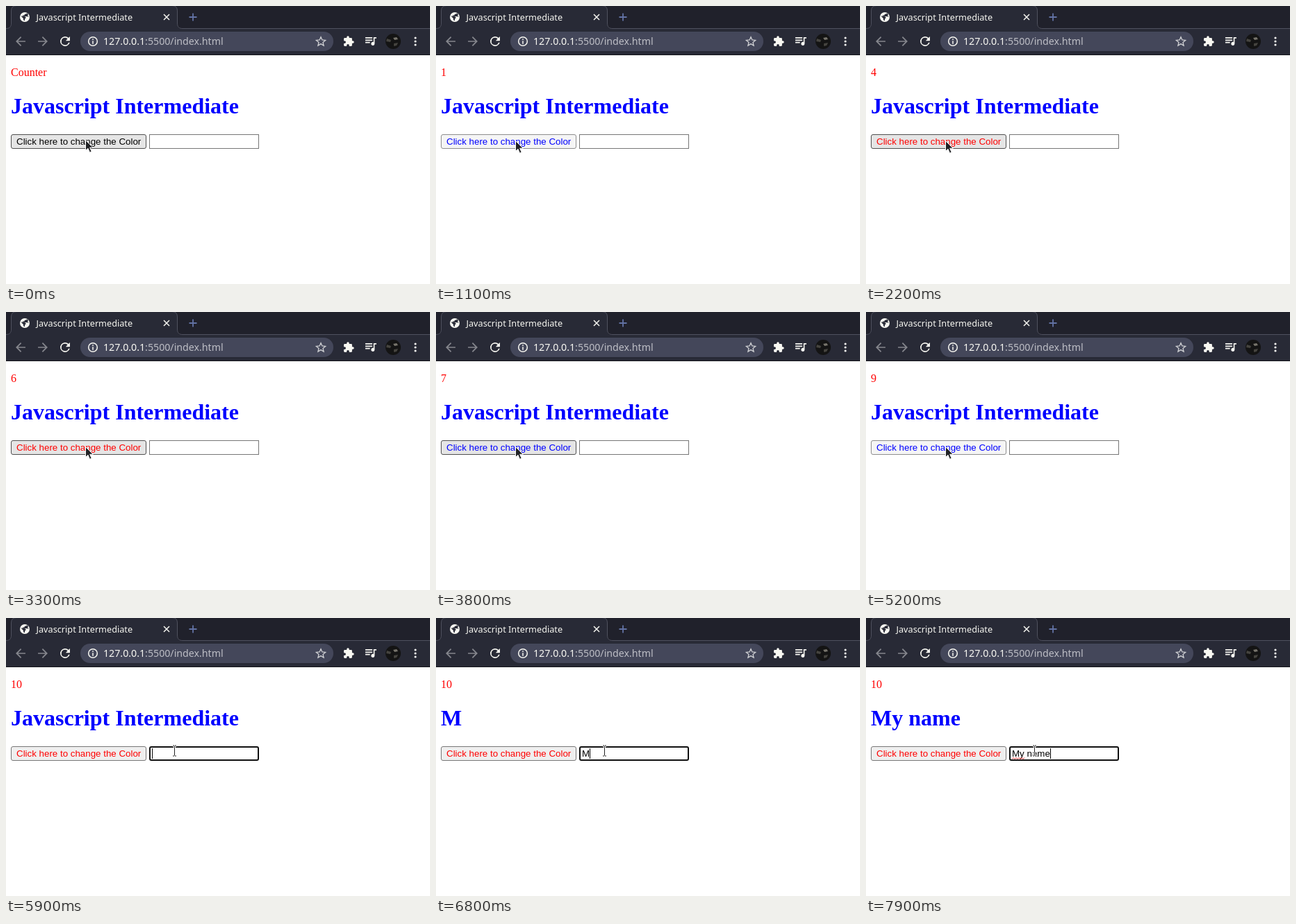
These frames come from a looping animation (610 px wide and 401 px high, 8 s). An HTML page:

```html
<!DOCTYPE html>
<html lang="en">
<head>
<meta charset="utf-8">
<title>Javascript Intermediate</title>
<style>
  html, body { margin: 0; width: 100%; height: 100%; overflow: hidden; background: #fff; }
  svg { display: block; }
  text { white-space: pre; }
  .ui { font-family: "Noto Sans", sans-serif; fill: #f8f8f2; }
  .serif { font-family: "Liberation Serif", serif; }
  .sans { font: 13.333px "Liberation Sans", sans-serif; }
  .line { fill: none; stroke: #f8f8f2; stroke-width: 1.5; }
</style>
</head>
<body>
<svg width="610" height="401" viewBox="0 0 610 401">
  <!-- Browser window -->
  <rect width="610" height="33" fill="#20212b"/>
  <rect y="32" width="610" height="39" fill="#282a36"/>
  <path d="M0 32.5C5 32.5 7.5 30 7.5 25V7Q7.5 -.5 15 -.5H239Q246.500 -.5 246.500 7V25C246.500 30 249 32.500 254 32.500H610V34H0Z" fill="#282a36"/>
  <path d="M0 32.5C5 32.5 7.5 30 7.5 25V7Q7.5 -.5 15 -.5H239Q246.5 -.5 246.5 7V25C246.5 30 249 32.5 254 32.5H610" fill="none" stroke="#50525f"/>
  <rect y="70" width="610" height="1" fill="#15161c"/>
  <circle cx="27" cy="16" r="7" fill="#f8f8f2"/>
  <path d="M21.500 14.500L25 18v2l2 1.500v-3l2-1.500-2-2h-3v-1.500h2l1.500-2h2l.5-1.500 2 2-1 2 2 1.500h1" fill="#282a36"/>
  <text class="ui" x="43.500" y="21" font-size="12.7">Javascript Intermediate</text>
  <path class="line" d="M227 12l8 8m0-8l-8 8"/>
  <path d="M263.500 16h11M269 10.500v11" stroke="#6272a4" stroke-width="1.800"/>

  <rect x="107" y="37" width="364" height="28" rx="14" fill="#44475a"/>
  <circle class="line" cx="125" cy="51" r="6.300"/>
  <path class="line" d="M125 47.300v1.600m0 1.300v4.500"/>
  <text class="ui" x="140" y="56" font-size="14.200">127.0.0.1<tspan fill="#bdbec5">:5500/index.html</tspan></text>
  <path class="line" stroke-width="1.300" d="M453 44.700l1.900 4.300 4.700.4-3.600 3.100 1.100 4.600-4.100-2.500-4.100 2.500 1.100-4.600-3.600-3.100 4.700-.4z" style="stroke:#d0d1d4;stroke-width:1.300"/>

  <g fill="#f8f8f2">
    <g fill="#85868d">
      <path id="arrow" transform="translate(21 51) scale(.87) translate(-12 -12)" d="M20 11H7.830l5.590-5.590L12 4l-8 8 8 8 1.410-1.410L7.830 13H20z"/>
      <use href="#arrow" transform="translate(74 0) scale(-1 1)"/>
    </g>
    <path transform="translate(85 51) scale(.87) translate(-12 -12)" d="M17.650 6.350A8 8 0 1 0 19.730 14h-2.080A6 6 0 1 1 12 6c1.660 0 3.140.69 4.220 1.780L13 11h7V4z"/>
    <path transform="translate(493 51) scale(.7) translate(-12 -12)" d="M20.500 11H19V7c0-1.100-.9-2-2-2h-4V3.500a2.500 2.500 0 0 0-5 0V5H4c-1.100 0-2 .9-2 2v3.800h1.500a2.700 2.700 0 0 1 0 5.400H2V20c0 1.100.9 2 2 2h3.800v-1.500a2.700 2.700 0 0 1 5.400 0V22H17c1.100 0 2-.9 2-2v-4h1.500a2.500 2.500 0 0 0 0-5z"/>
    <path transform="translate(524.500 51) scale(.84) translate(-12 -13)" d="M15 6H3v2h12zm0 4H3v2h12zM3 16h8v-2H3zM17 6v8.200a3 3 0 1 0 2 2.800V8h3V6z"/>
    <circle cx="589" cy="46" r="1.600"/>
    <circle cx="589" cy="51" r="1.600"/>
    <circle cx="589" cy="56" r="1.600"/>
  </g>
  <circle cx="557" cy="51" r="11" fill="#141414"/>
  <path d="M548 47l6 2-1 3-6-1zM558 54l6-1-2 4-4 1z" fill="#45443f"/>
  <path d="M557 46l5-1 2 3-5 1z" fill="#77746c"/>

  <!-- Page -->
  <text id="counter" class="serif" x="7" y="101" font-size="16" fill="#f00"></text>
  <text id="heading" class="serif" x="7" y="155" font-size="32" font-weight="bold" fill="#00f"></text>
  <rect id="button" x="7.500" y="185.500" width="194" height="20" rx="2.500"/>
  <text id="label" class="sans" x="15" y="200">Click here to change the Color</text>
  <rect id="field" fill="#fff"/>
  <text id="typed" class="sans" x="210" y="200"></text>
  <path id="squiggle" d="M210 203.500l2-2 2 2 2-2 2 2 2-2 2 2 2-2 2 2 2-2" fill="none" stroke="#f00" stroke-width=".9"/>
  <rect id="caret" y="188" width="1" height="15"/>

  <path id="pointer" d="M.5 .5V15.500L4 12.300 6.500 18.300 9.200 17.200 6.700 11.300H11.300Z" fill="#222326" stroke="#fff"/>
  <g id="beam" fill="none">
    <path d="M-3 -7.500H3M0 -7.500V7.500M-3 7.500H3" stroke="#fff" stroke-width="3"/>
    <path d="M-2.500 -7.500H-.5M.5 -7.500H2.500M0 -7V7M-2.500 7.500H-.5M.5 7.500H2.500" stroke="#222"/>
  </g>
</svg>
<script>
const LOOP = 8000, STEP = 100;
const ui = {};
for (const el of document.querySelectorAll('svg [id]')) ui[el.id] = el;

const clicks = [700, 1200, 1700, 2200, 2800, 3300, 3800, 4300, 4800, 5300];
const presses = [1100, 1600, 2100, 3700, 4200, 4700, 5200];
const keys = [6800, 7100, 7300, 7600, 7700, 7800, 7900];
const passed = (times, t) => times.filter(time => time <= t).length;

function set(el, attrs) {
  for (const name in attrs) el.setAttribute(name, attrs[name]);
}
function show(el, on) {
  el.style.display = on ? '' : 'none';
}

function draw(time) {
  const t = Math.floor(time / STEP) * STEP;

  // Pointer glides from the button to the text field
  const p = Math.min(1, Math.max(0, (t - 5300) / 500));
  const ease = p * p * (3 - 2 * p);
  const x = Math.round(114 + 128 * ease);
  const y = Math.round((t < 100 ? 193 : 194) - 3 * ease);
  const overField = x >= 206;
  set(ui.pointer, { transform: `translate(${x} ${y})` });
  set(ui.beam, { transform: `translate(${x + .5} ${y + .5})` });
  show(ui.pointer, !overField);
  show(ui.beam, overField);

  // Every click counts up and swaps the label colour
  const count = passed(clicks, t);
  ui.counter.textContent = count || 'Counter';
  set(ui.label, { fill: !count ? '#000' : count % 2 ? '#00f' : '#f00' });
  const [fill, stroke] = presses.includes(t) ? ['#f5f5f5', '#8d8d8d']
    : x < 202 ? ['#e5e5e5', '#4f4f4f'] : ['#efefef', '#767676'];
  set(ui.button, { fill, stroke });

  // The heading mirrors the field
  const typed = 'My name'.slice(0, passed(keys, t));
  ui.typed.textContent = typed;
  ui.heading.textContent = typed || 'Javascript Intermediate';
  const focused = t >= 5900;
  set(ui.field, focused
    ? { x: 207, y: 186, width: 156, height: 19, rx: 2, stroke: '#101010', 'stroke-width': 2 }
    : { x: 206.5, y: 185.5, width: 157, height: 20, rx: 0, stroke: '#767676', 'stroke-width': 1 });
  const width = typed ? ui.typed.getComputedTextLength() : 0;
  set(ui.caret, { x: 210 + Math.round(width) });
  show(ui.caret, focused && (t < 6400 || typed));
  show(ui.squiggle, typed.length > 2);
}

function frame() {
  draw(performance.now() % LOOP);
  requestAnimationFrame(frame);
}
frame();
</script>
</body>
</html>
```
